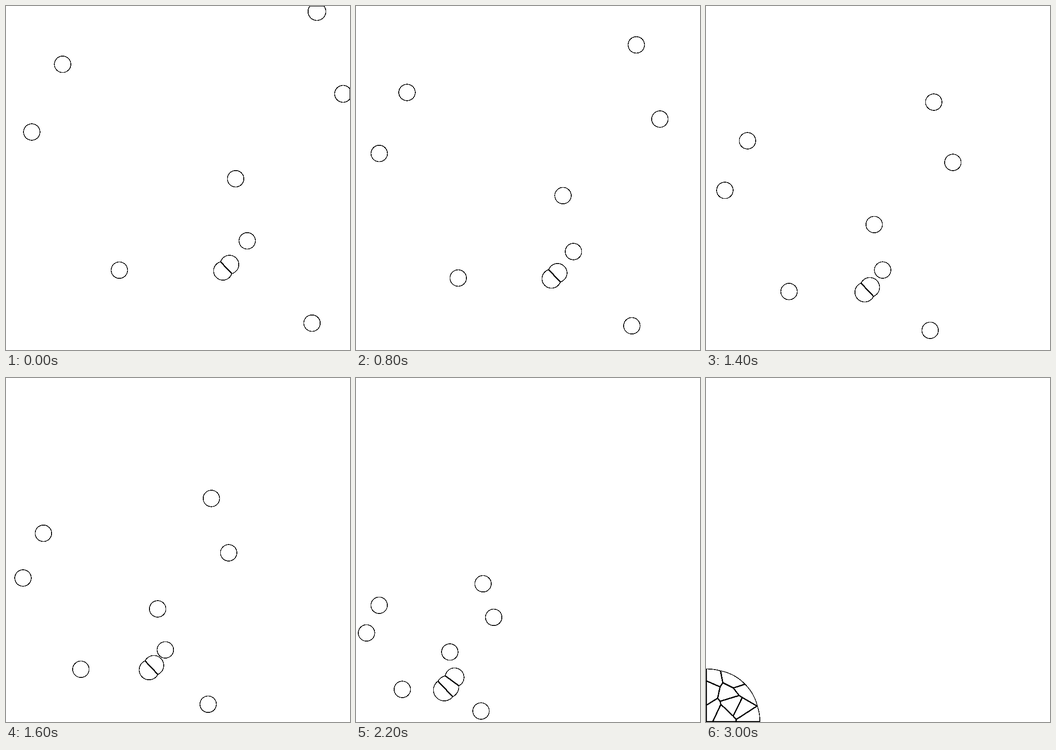
Animation, 748 px wide and 748 px high, one loop 3.2 s. Source, as an HTML page with a canvas:

```html
<!DOCTYPE html>
<html lang="en">
<head>
<meta charset="utf-8">
<title>Equal-area cells</title>
<style>
html, body { margin: 0; width: 100%; height: 100%; overflow: hidden; background: #fff; }
canvas { display: block; }
</style>
</head>
<body>
<canvas id="stage" width="748" height="748"></canvas>
<script>
const SIZE = 748, STEP = 200, COUNT = 16;
const RADIUS = 18.65, AREA = Math.PI * RADIUS * RADIUS;
const PULL = 0.01, PRESSURE = 0.004;
const ARC_W = 1.6, EDGE_W = 1.4, WALL_W = 2;
const ARC = -1, WALL = -2;

// Sites measured from the lower left corner, y upwards
const sites = [
  [123.1, 621.2], [56, 474], [676.1, 736], [733, 557], [499.3, 372.4],
  [524.5, 237.4], [246.5, 173.6], [665.4, 58.4], [471.6, 172.1], [486, 185.7]
];

const ctx = document.getElementById('stage').getContext('2d');

// Keep the part of a convex polygon with a*x + b*y <= c; label the new side
function clip(poly, a, b, c, label) {
  const out = [];
  for (let k = 0; k < poly.length; k++) {
    const p = poly[k], q = poly[(k + 1) % poly.length];
    const dp = a * p.x + b * p.y - c, dq = a * q.x + b * q.y - c;
    if (dp <= 0) out.push(p);
    if ((dp <= 0) !== (dq <= 0)) {
      const u = dp / (dp - dq);
      out.push({
        x: p.x + u * (q.x - p.x),
        y: p.y + u * (q.y - p.y),
        e: dp <= 0 ? label : p.e
      });
    }
  }
  return out;
}

// Power cell of site i, cut to its disc and to the stage
function cell(pts, w, i) {
  const [px, py] = pts[i], r = Math.sqrt(w[i]), n = 180;
  let poly = [];
  for (let k = 0; k < n; k++) {
    const t = 2 * Math.PI * k / n;
    poly.push({ x: px + r * Math.cos(t), y: py + r * Math.sin(t), e: ARC });
  }
  poly = clip(poly, -1, 0, 0, WALL);
  poly = clip(poly, 1, 0, SIZE, WALL);
  poly = clip(poly, 0, -1, 0, WALL);
  poly = clip(poly, 0, 1, SIZE, WALL);
  pts.forEach(([qx, qy], j) => {
    if (j === i) return;
    const c = qx * qx + qy * qy - px * px - py * py - w[j] + w[i];
    poly = clip(poly, 2 * (qx - px), 2 * (qy - py), c, j);
  });
  return poly;
}

// Areas, centroid offsets from the sites, and area derivatives by weight
function measure(pts, w) {
  const area = [], off = [], jac = [];
  pts.forEach(([cx, cy], i) => {
    const poly = cell(pts, w, i), row = new Array(pts.length).fill(0);
    let sum = 0, mx = 0, my = 0;
    poly.forEach((p, k) => {
      const q = poly[(k + 1) % poly.length];
      const ax = p.x - cx, ay = p.y - cy, bx = q.x - cx, by = q.y - cy;
      const cross = ax * by - bx * ay;
      sum += cross;
      mx += cross * (ax + bx);
      my += cross * (ay + by);
      const len = Math.hypot(bx - ax, by - ay);
      if (p.e === ARC) {
        row[i] += len / (2 * Math.sqrt(w[i]));
      } else if (p.e >= 0) {
        const d = Math.hypot(cx - pts[p.e][0], cy - pts[p.e][1]);
        row[i] += len / (2 * d);
        row[p.e] -= len / (2 * d);
      }
    });
    area.push(sum / 2);
    off.push([mx / (3 * sum), my / (3 * sum)]);
    jac.push(row);
  });
  return { area, off, jac };
}

function solve(m, v) {
  const n = v.length, x = v.slice(), a = m.map(r => r.slice());
  for (let k = 0; k < n; k++) {
    for (let i = k + 1; i < n; i++) {
      const f = a[i][k] / (a[k][k] || 1e-12);
      for (let j = k; j < n; j++) a[i][j] -= f * a[k][j];
      x[i] -= f * x[k];
    }
  }
  for (let i = n - 1; i >= 0; i--) {
    for (let j = i + 1; j < n; j++) x[i] -= a[i][j] * x[j];
    x[i] /= a[i][i] || 1e-12;
  }
  return x;
}

const miss = s => Math.hypot(...s.area.map(a => AREA - a));

// Damped Newton: squared radii that give every cell the same area
function balance(pts) {
  let w = pts.map(() => RADIUS * RADIUS);
  let now = measure(pts, w);
  const floor = Math.min(AREA, ...now.area) / 2;
  for (let n = 0; n < 60 && miss(now) > 0.5; n++) {
    const dir = solve(now.jac, now.area.map(a => AREA - a));
    let t = 1, found = false;
    while (!found && t > 1e-4) {
      const next = w.map((v, i) => v + t * dir[i]);
      if (next.every(v => v > 0)) {
        const s = measure(pts, next);
        if (s.area.every(a => a >= floor) && miss(s) <= (1 - t / 2) * miss(now)) {
          w = next;
          now = s;
          found = true;
        }
      }
      t /= 2;
    }
    if (!found) break;
  }
  return { w, off: now.off };
}

// Hard-edged outlines: each cell paints a band inside its own border
function render(pts, w) {
  const img = new ImageData(SIZE, SIZE);
  const px = new Uint32Array(img.data.buffer).fill(0xffffffff);
  pts.forEach(([cx, cy], i) => {
    const r = Math.sqrt(w[i]);
    const others = pts.map(([qx, qy], j) => ({
      qx, qy, wj: w[j], d2: 2 * Math.hypot(qx - cx, qy - cy)
    })).filter((_, j) => j !== i);
    const x0 = Math.max(0, Math.floor(cx - r)), x1 = Math.min(SIZE - 1, Math.ceil(cx + r));
    const y0 = Math.max(0, Math.floor(cy - r)), y1 = Math.min(SIZE - 1, Math.ceil(cy + r));
    for (let gy = y0; gy <= y1; gy++) {
      for (let gx = x0; gx <= x1; gx++) {
        const x = gx + 0.5, y = gy + 0.5;
        const dd = (x - cx) ** 2 + (y - cy) ** 2;
        if (dd > w[i]) continue;
        let gap = Infinity;
        for (const o of others) {
          const g = ((x - o.qx) ** 2 + (y - o.qy) ** 2 - o.wj - dd + w[i]) / o.d2;
          if (g < gap) gap = g;
        }
        if (gap < 0) continue;
        const wall = Math.min(x, y, SIZE + 1 - x, SIZE + 1 - y);
        if (gap < EDGE_W || wall < WALL_W || r - Math.sqrt(dd) < ARC_W) {
          px[(SIZE - 1 - gy) * SIZE + gx] = 0xff000000;
        }
      }
    }
  });
  return img;
}

// Sites fall towards the corner while crowded cells push them back
function simulate() {
  const pts = sites.map(p => p.slice()), vel = sites.map(() => [0, 0]);
  const out = [];
  for (let k = 0; k < COUNT; k++) {
    const { w, off } = balance(pts);
    out.push(render(pts, w));
    pts.forEach((p, i) => {
      for (const c of [0, 1]) {
        vel[i][c] += PRESSURE * off[i][c] - PULL * p[c];
        p[c] += vel[i][c];
      }
    });
  }
  return out;
}

const poses = simulate();
let shown = -1;
const start = performance.now();
function tick() {
  const k = Math.floor((performance.now() - start) / STEP) % COUNT;
  if (k !== shown) {
    ctx.putImageData(poses[k], 0, 0);
    shown = k;
  }
  requestAnimationFrame(tick);
}
tick();
</script>
</body>
</html>
```
